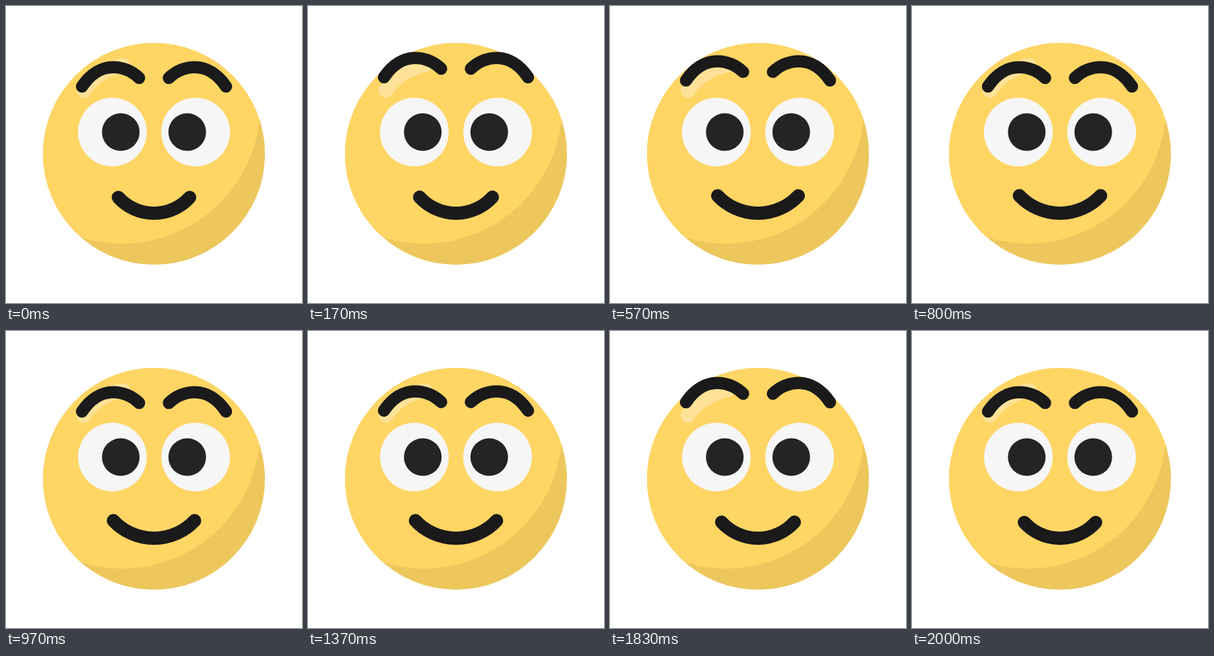
Animation of 448 by 450 pixels, one loop 2030 ms. Source, as an HTML page:

```html
<!DOCTYPE html>
<html lang="en">
<head>
<meta charset="utf-8">
<title>Blinking smiley</title>
<style>
  html, body { margin: 0; width: 100%; height: 100%; overflow: hidden; background: #fff; }
  svg { display: block; width: 100%; height: 100%; }
  .line { fill: none; stroke: #1a1a1a; stroke-linecap: round; }
</style>
</head>
<body>
<svg viewBox="0 0 448 450">
  <defs>
    <clipPath id="head"><circle cx="224" cy="224" r="168"/></clipPath>
    <path id="brow" d="M115 122C128 102.500 145 92.800 162 92.800C177.500 92.800 190.500 98.500 201.500 109"/>
  </defs>

  <circle cx="224" cy="224" r="168" fill="#edc75c"/>
  <circle cx="175.600" cy="150.800" r="209.100" fill="#ffd564" clip-path="url(#head)"/>
  <path d="M118 128Q139 97 177 90" fill="none" stroke="#ffe298" stroke-width="22" stroke-linecap="round"/>

  <g id="eyes">
    <g fill="#f6f6f6">
      <circle cx="161" cy="191" r="52"/>
      <circle cx="287" cy="191" r="52"/>
    </g>
    <g fill="#242424">
      <circle cx="173.700" cy="191" r="28.500"/>
      <circle cx="274.300" cy="191" r="28.500"/>
    </g>
  </g>

  <g id="brows" class="line" stroke-width="18.500">
    <use href="#brow"/>
    <use href="#brow" transform="matrix(-1 0 0 1 448 0)"/>
  </g>
  <path id="mouth" class="line" stroke-width="20"/>
</svg>

<script>
const LOOP = 2030;
const STEP = 100 / 3;
const SECOND_START = 40; // steps before the second half begins
const HALF = 20;         // steps in each moving half

const [eyes, brows, mouth] = ['eyes', 'brows', 'mouth'].map(id => document.getElementById(id));

const clamp = x => Math.min(1, Math.max(0, x));
const ease = x => (1 - Math.cos(Math.PI * clamp(x))) / 2;

// Circular arc of given half width and depth, centred on x = 224
function smile(wide) {
  const half = 54 + 7.5 * wide;
  const y = 290 - 2.7 * wide;
  const depth = 314 - y;
  const r = (half * half + depth * depth) / (2 * depth);
  return `M${224 - half} ${y}A${r} ${r} 0 0 0 ${224 + half} ${y}`;
}

function draw(now) {
  const step = Math.floor((now % LOOP + 3.4) / STEP);
  const second = step >= SECOND_START;
  const p = clamp((second ? step - SECOND_START : step) / HALF);

  const lift = 14 * ease(1 - Math.abs((p * 4) % 2 - 1));
  const shut = ease(1 - Math.abs(p * 4 - 2));
  const wide = second ? 1 - ease(p) : ease(p);

  brows.setAttribute('transform', `translate(0 ${-lift})`);
  eyes.setAttribute('transform', `translate(0 191) scale(1 ${1 - 0.74 * shut}) translate(0 -191)`);
  mouth.setAttribute('d', smile(wide));
}

const start = performance.now();
function tick() {
  draw(performance.now() - start);
  requestAnimationFrame(tick);
}
tick();
</script>
</body>
</html>
```
